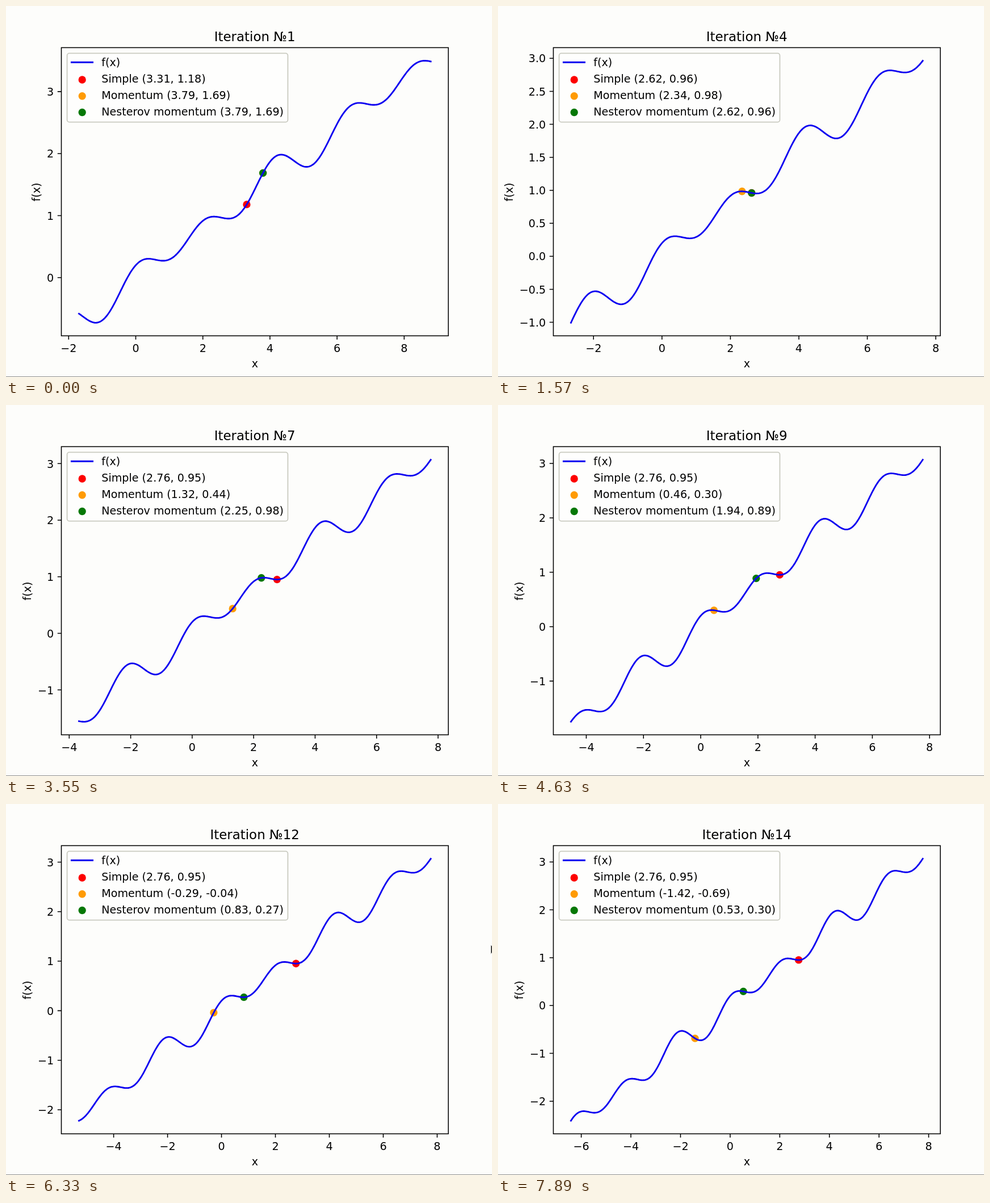
Recreate the animation shown at these times as an HTML page. Size 856 px wide and 654 px high, loop 7.99 s.

```html
<!DOCTYPE html>
<html lang="en">
<head>
<meta charset="utf-8">
<title>Gradient descent with momentum</title>
<style>
  html, body { margin: 0; width: 100%; height: 100%; overflow: hidden; background: #fdfdfb; }
  svg { display: block; width: 856px; height: 654px; }
  text { font: 19.1px "DejaVu Sans", sans-serif; fill: #000; }
  .title { font-size: 22.92px; }
  .mid { text-anchor: middle; }
  .end { text-anchor: end; }
  .axis { fill: none; stroke: #000; stroke-width: 1.55; }
  .curve { fill: none; stroke: #0d00f0; stroke-width: 2.86; stroke-linejoin: round; stroke-linecap: square; }
  .legend { fill: #fff; fill-opacity: .6; stroke: #c9cac0; stroke-width: 1.8; }
</style>
</head>
<body>
<svg viewBox="0 0 856 654">
  <rect width="856" height="654" fill="#fdfdfb"/>
  <rect y="653" width="856" height="1" fill="#8e8e8c"/>
  <g id="dots"></g>
  <path id="curve" class="curve"/>
  <path id="ticks" class="axis"/>
  <rect class="axis" x="97.5" y="73.4" width="681.6" height="508"/>
  <g id="labels"></g>
  <text class="mid" x="438.5" y="636.6">x</text>
  <text id="ylabel" class="mid">f(x)</text>
  <text id="title" class="mid title" x="438.2" y="62"></text>
  <rect class="legend" x="107.6" y="83.4" width="388.8" height="121.2" rx="3.8"/>
  <path class="curve" d="M115.4 99.2H152.6"/>
  <text x="168.3" y="106.3">f(x)</text>
  <g id="legend"></g>
  <g id="cursor" visibility="hidden">
    <path d="M853.4 248.5V265L856 263V250Z" fill="#d5d5d3"/>
    <path d="M854.6 249.5V262.5H856V250.5Z" fill="#111"/>
  </g>
</svg>
<script>
const LOOP = 7990;
const STARTS = [0, 450, 830, 1170, 1650, 2130, 2810, 3650, 4630, 5210, 5770, 6310, 6870, 7430];
const BOX = { left: 97.5, right: 779.1, top: 73.4, bottom: 581.4 };
const METHODS = [['Simple', '#fd0000'], ['Momentum', '#ff9b05'], ['Nesterov momentum', '#067806']];
const BETA = 0.7;
const $ = id => document.getElementById(id);

const f = x => 0.4 * x + 0.2 * Math.cos(3 * x) + 0.1 * Math.sin(2 * x);
const slope = x => 0.4 - 0.6 * Math.sin(3 * x) + 0.2 * Math.cos(2 * x);

function descend(count) {
  let simple = 4, mom = 4, nest = 4, vm = 0, vn = 0;
  return Array.from({ length: count }, () => {
    simple -= slope(simple);
    vm = BETA * vm + (1 - BETA) * slope(mom);
    mom -= vm;
    vn = BETA * vn + (1 - BETA) * slope(nest - BETA * vn);
    nest -= vn;
    return [simple, mom, nest];
  });
}
const steps = descend(STARTS.length);

// Axis with 5% margins and at most nine tick intervals
function axis(lo, hi, from, to) {
  const pad = (hi - lo) * 0.05;
  const min = lo - pad, max = hi + pad;
  const step = [0.5, 1, 2].find(s => s >= (max - min) / 9);
  const ticks = [];
  for (let i = Math.ceil(min / step); i * step <= max; i++) ticks.push(i * step);
  const digits = step < 1 ? 1 : 0;
  return {
    at: v => from + (v - min) / (max - min) * (to - from),
    ticks,
    name: v => (v < 0 ? '\u2212' : '') + Math.abs(v).toFixed(digits)
  };
}

const dot = (x, y, color) =>
  `<circle cx="${x.toFixed(2)}" cy="${y.toFixed(2)}" r="6.65" fill="${color}"/>`;
const label = (x, y, s, cls = '') =>
  `<text class="${cls}" x="${x.toFixed(2)}" y="${y.toFixed(2)}">${s}</text>`;

function draw(n) {
  const pts = steps[n];
  const lo = Math.min(pts[0], pts[1]) - 5;
  const hi = Math.max(pts[0], pts[1]) + 5;
  const xs = Array.from({ length: 401 }, (_, i) => lo + (hi - lo) * i / 400);
  const ys = xs.map(f);
  const ax = axis(lo, hi, BOX.left, BOX.right);
  const ay = axis(Math.min(...ys), Math.max(...ys), BOX.bottom, BOX.top);

  $('curve').setAttribute('d', 'M' + xs.map((x, i) =>
    ax.at(x).toFixed(2) + ' ' + ay.at(ys[i]).toFixed(2)).join('L'));
  $('dots').innerHTML = pts.map((x, i) => dot(ax.at(x), ay.at(f(x)), METHODS[i][1])).join('');
  $('ticks').setAttribute('d',
    ax.ticks.map(v => `M${ax.at(v)} ${BOX.bottom}v6.7`).join('') +
    ay.ticks.map(v => `M${BOX.left} ${ay.at(v)}h-6.7`).join(''));
  $('labels').innerHTML =
    ax.ticks.map(v => label(ax.at(v), 610.2, ay && ax.name(v), 'mid')).join('') +
    ay.ticks.map(v => label(84.2, ay.at(v) + 7.2, ay.name(v), 'end')).join('');

  // The y label keeps clear of the widest tick label
  const em = 19.1;
  const width = Math.max(...ay.ticks.map(v => {
    const s = ay.name(v);
    return em * ((v < 0 ? 0.838 : 0) + 0.636 + (s.includes('.') ? 0.954 : 0));
  }));
  $('ylabel').setAttribute('transform', `translate(${(72 - width).toFixed(2)} 328) rotate(-90)`);

  $('title').textContent = 'Iteration \u2116' + (n + 1);
  $('legend').innerHTML = METHODS.map(([name, color], i) =>
    dot(134.2, 130 + 28.75 * i, color) +
    label(168.3, 135 + 28.75 * i, `${name} (${pts[i].toFixed(2)}, ${f(pts[i]).toFixed(2)})`)).join('');
}

let shown = -1;
const begin = performance.now();
function tick(now) {
  const t = Math.max(0, now - begin) % LOOP;
  const n = STARTS.filter(s => s <= t).length - 1;
  if (n !== shown) draw(shown = n);
  $('cursor').setAttribute('visibility', t >= 6000 && t < 6700 ? 'visible' : 'hidden');
  requestAnimationFrame(tick);
}
tick(begin);
</script>
</body>
</html>
```
